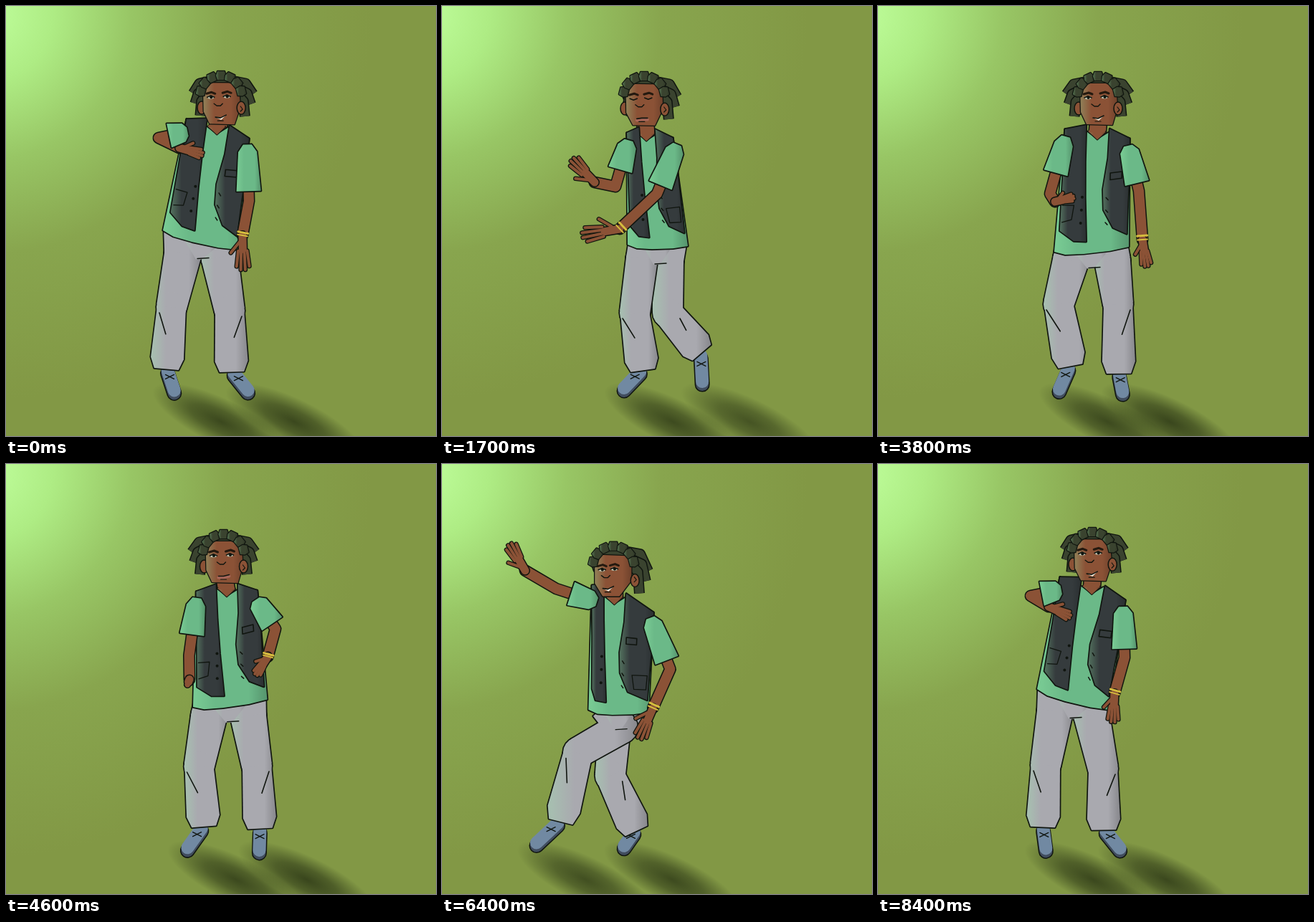
An HTML page with a canvas that plays this animation: 600x600 px, repeating every 8.5 s.

```html
<!DOCTYPE html>
<html lang="en">
<head>
<meta charset="utf-8">
<title>Dancer</title>
<style>
html, body { margin: 0; width: 100%; height: 100%; overflow: hidden; background: #829845; }
canvas { display: block; width: 100vw; height: 100vh; }
</style>
</head>
<body>
<canvas id="stage" width="600" height="600"></canvas>
<script>
const ctx = document.getElementById('stage').getContext('2d');
const LOOP = 8500, STEP = 100;
const INK = '#10150f', SKIN = '#8b5236', SHIRT = '#6bb988', VEST = '#353b3d',
      PANTS = '#a9a9af', HAIR = '#3a432f', SHOE = '#7189a2', SOLE = '#414d5e';

// Poses: shoulders, hem, arms (elbow, wrist, tip) and legs (hip, knee, ankle, toe).
// face = [turn to the left, eyes open, smile]
const keys = [];
const key = (time, pose) => { keys.push({ time, pose }); return pose; };

const rest = key(0, {
  head: [300, 137], face: [0.1, 1, 1],
  shoulderL: [252, 158], shoulderR: [339, 185], hemL: [219, 313], hemR: [323, 340],
  elbowL: [213, 184], wristL: [242, 198], tipL: [274, 207],
  elbowR: [339, 272], wristR: [330, 320], tipR: [331, 368],
  hipL: [247, 345], kneeL: [231, 420], ankleL: [224, 504], toeL: [234, 534],
  hipR: [298, 350], kneeR: [312, 425], ankleR: [315, 508], toeR: [336, 534]
});
key(1700, {
  head: [282, 138], face: [0.4, 0, 0],
  shoulderL: [258, 177], shoulderR: [322, 184], hemL: [259, 333], hemR: [343, 335],
  elbowL: [242, 252], wristL: [213, 246], tipL: [182, 214],
  elbowR: [300, 262], wristR: [248, 311], tipR: [196, 320],
  hipL: [279, 352], kneeL: [269, 428], ankleL: [280, 506], toeL: [256, 531],
  hipR: [315, 355], kneeR: [315, 428], ankleR: [361, 482], toeR: [363, 521]
});
const reach = key(2700, {
  head: [238, 155], face: [1, 1, 1],
  shoulderL: [208, 169], shoulderR: [294, 208], hemL: [203, 343], hemR: [286, 347],
  elbowL: [157, 172], wristL: [113, 145], tipL: [92, 107],
  elbowR: [317, 288], wristR: [293, 343], tipR: [275, 386],
  hipL: [250, 368], kneeL: [188, 402], ankleL: [164, 496], toeL: [132, 526],
  hipR: [238, 375], kneeR: [232, 435], ankleR: [268, 510], toeR: [253, 531]
});
key(3800, {
  head: [307, 138], face: [0, 1, 1],
  shoulderL: [261, 172], shoulderR: [351, 185], hemL: [246, 343], hemR: [350, 336],
  elbowL: [240, 262], wristL: [247, 273], tipL: [273, 267],
  elbowR: [364, 258], wristR: [369, 326], tipR: [375, 363],
  hipL: [269, 355], kneeL: [252, 416], ankleL: [268, 500], toeL: [254, 532],
  hipR: [327, 355], kneeR: [335, 416], ankleR: [336, 510], toeR: [341, 536]
});
key(5400, {
  head: [300, 138], face: [0, 1, 0],
  shoulderL: [270, 184], shoulderR: [350, 168], hemL: [276, 335], hemR: [379, 321],
  elbowL: [271, 272], wristL: [265, 328], tipL: [232, 352],
  elbowR: [388, 202], wristR: [362, 211], tipR: [323, 225],
  hipL: [297, 350], kneeL: [287, 428], ankleL: [284, 507], toeL: [256, 534],
  hipR: [349, 348], kneeR: [365, 426], ankleR: [373, 502], toeR: [366, 537]
});
key(6500, reach);
key(7300, {
  head: [260, 125], face: [1, 1, 1],
  shoulderL: [238, 163], shoulderR: [318, 176], hemL: [240, 284], hemR: [322, 303],
  elbowL: [168, 180], wristL: [167, 115], tipL: [172, 69],
  elbowR: [348, 252], wristR: [334, 310], tipR: [320, 354],
  hipL: [296, 307], kneeL: [220, 306], ankleL: [240, 386], toeL: [209, 412],
  hipR: [263, 330], kneeR: [271, 430], ankleR: [275, 510], toeR: [248, 531]
});
key(8100, rest);
key(8400, { ...rest,
  head: [299, 135], shoulderL: [254, 158], shoulderR: [345, 190],
  hemL: [222, 314], hemR: [322, 343], wristL: [238, 199], tipL: [268, 213],
  elbowR: [344, 270], tipR: [328, 360], kneeL: [234, 420], ankleL: [230, 504],
  kneeR: [314, 425]
});
key(LOOP, rest);

const lerp = (a, b, k) => a.map((v, i) => v + (b[i] - v) * k);
const shift = (p, x, y) => [p[0] + x, p[1] + y];

function poseAt(time) {
  const i = keys.findIndex(k => k.time > time);
  const from = keys[i - 1], to = keys[i];
  const k = (time - from.time) / (to.time - from.time);
  const eased = (1 - Math.cos(Math.PI * k)) / 2;
  const pose = {};
  for (const part in rest) pose[part] = lerp(from.pose[part], to.pose[part], eased);
  return pose;
}

function trace(points, closed) {
  ctx.beginPath();
  points.forEach(p => ctx.lineTo(...p));
  if (closed) ctx.closePath();
}

function line(points, width = 1.6, color = INK) {
  trace(points);
  ctx.lineWidth = width;
  ctx.strokeStyle = color;
  ctx.stroke();
}

// Polygons merged under one outline, lit from the left and shaded on the right
function merged(polygons, color, outline = 3.4) {
  const xs = polygons.flat().map(p => p[0]);
  const light = ctx.createLinearGradient(Math.min(...xs), 0, Math.max(...xs), 0);
  light.addColorStop(0, 'rgba(160,255,180,.28)');
  light.addColorStop(0.3, 'rgba(160,255,180,0)');
  light.addColorStop(0.75, 'rgba(0,0,0,0)');
  light.addColorStop(1, 'rgba(0,0,0,.2)');
  if (outline) polygons.forEach(points => line([...points, points[0], points[1]], outline));
  for (const points of polygons) {
    trace(points, true);
    ctx.fillStyle = color;
    ctx.fill();
  }
  // One union path, so that the light is not applied twice where parts overlap
  ctx.beginPath();
  for (const points of polygons) {
    points.forEach((p, i) => i ? ctx.lineTo(...p) : ctx.moveTo(...p));
    ctx.closePath();
  }
  ctx.fillStyle = light;
  ctx.fill();
}

const shape = (points, color, outline) => merged([points], color, outline);

function strand(points, width, color) {
  line(points, width + 3, INK);
  line(points, width, color);
}

function dot(x, y, rx, ry, color, outline) {
  ctx.beginPath();
  ctx.ellipse(x, y, rx, ry, 0, 0, 7);
  ctx.fillStyle = color;
  ctx.fill();
  if (outline) { ctx.lineWidth = 1.5; ctx.strokeStyle = INK; ctx.stroke(); }
}

// Outline of a limb with a half-width at each joint
function tube(points, widths) {
  const left = [], right = [];
  points.forEach((p, i) => {
    const a = points[Math.max(i - 1, 0)], b = points[Math.min(i + 1, points.length - 1)];
    const dx = b[0] - a[0], dy = b[1] - a[1], k = widths[i] / (Math.hypot(dx, dy) || 1);
    left.push(shift(p, dy * k, -dx * k));
    right.unshift(shift(p, -dy * k, dx * k));
  });
  return left.concat(right);
}

const disc = (center, radius) => Array.from({ length: 20 }, (_, i) =>
  shift(center, radius * Math.cos(i * Math.PI / 10), radius * Math.sin(i * Math.PI / 10)));

function background() {
  const glow = ctx.createRadialGradient(-30, 10, 0, -30, 10, 600);
  glow.addColorStop(0, '#bfff9c');
  glow.addColorStop(0.16, '#aeec84');
  glow.addColorStop(0.34, '#98c665');
  glow.addColorStop(0.56, '#88a54e');
  glow.addColorStop(0.9, '#829845');
  ctx.fillStyle = glow;
  ctx.fillRect(0, 0, 600, 600);
}

function footShadow(toe) {
  const strength = Math.max(0, 1 - (535 - toe[1]) / 90) * 0.75;
  const blur = ctx.createRadialGradient(0, 0, 0, 0, 0, 1);
  blur.addColorStop(0, `rgba(34,44,16,${strength})`);
  blur.addColorStop(0.45, `rgba(34,44,16,${strength * 0.7})`);
  blur.addColorStop(1, 'rgba(34,44,16,0)');
  ctx.save();
  ctx.translate(toe[0] + 66, 580);
  ctx.rotate(0.45);
  ctx.scale(105, 32);
  ctx.fillStyle = blur;
  ctx.fillRect(-1, -1, 2, 2);
  ctx.restore();
}

function leg(waist, half, hip, knee, ankle, toe, side) {
  const heel = lerp(ankle, toe, 0.15), front = lerp(ankle, toe, 1.08);
  strand([shift(heel, 0, 4), shift(front, 0, 4)], 18, SOLE);
  line([heel, front], 18, SHOE);
  const lace = lerp(heel, toe, 0.35);
  line([shift(lace, -6, -3), shift(lace, 6, 3)], 1.3);
  line([shift(lace, 6, -3), shift(lace, -6, 3)], 1.3);

  const thigh = Math.max(22, half);
  merged([
    tube([waist, hip], [half, thigh]), disc(hip, thigh),
    tube([hip, knee], [thigh, 21]), disc(knee, 21),
    tube([knee, lerp(knee, ankle, 0.85), lerp(knee, ankle, 1.03)], [20, 23, 17])
  ], PANTS);
  line([shift(knee, -side * 17, 8), shift(lerp(knee, ankle, 0.45), -side * 5, 0)]);
}

function hand(wrist, tip, side) {
  const dx = tip[0] - wrist[0], dy = tip[1] - wrist[1];
  const at = (along, across) =>
    shift(lerp(wrist, tip, along), -dy * across * side, dx * across * side);
  const palm = at(0.4, 0);
  const fingers = [-0.18, -0.06, 0.07, 0.19].map((s, i) => [at(0.45, s * 0.7), at(i % 3 ? 1 : 0.9, s)]);
  fingers.push([at(0.2, 0.1), at(0.5, 0.35)]);
  fingers.forEach(f => line(f, 6.5));
  line([wrist, palm], 14);
  fingers.forEach(f => line(f, 4, SKIN));
  line([wrist, palm], 11, SKIN);
}

function arm(root, elbow, wrist, tip, side, sleeve) {
  const cuff = lerp(root, elbow, sleeve);
  strand([lerp(root, elbow, sleeve / 2), elbow, wrist], 14, SKIN);
  hand(wrist, tip, side);
  shape(tube([lerp(root, elbow, -0.15), root, cuff], [6, 13, 17]), SHIRT);
}

function torso(p) {
  const turn = p.face[0];
  const on = (u, v) => lerp(lerp(p.shoulderL, p.shoulderR, u), lerp(p.hemL, p.hemR, u), v);
  const neck = shift(on(0.5, 0), -12 * turn, 8);
  strand([shift(p.head, 1, 18), shift(neck, 0, -8)], 23, SKIN);
  shape([on(0, 0), shift(neck, -16, -12), neck, shift(neck, 16, -10), on(1, 0), on(1, 0.5),
    on(1, 1), on(0.75, 1.025), on(0.4, 1.035), on(0.15, 1.03), on(0, 1)], SHIRT);
  shape([shift(neck, -13, -12), neck, shift(neck, 12, -11)], SKIN, 2);
  line([shift(neck, -10, -12), shift(neck, 9, -12)], 4, SKIN);

  // Turning the body slides the open front of the vest sideways
  const slide = u => u > 0.1 && u < 0.9 ? u - 0.14 * turn : u;
  const panel = points => shape(points.map(([u, v]) => on(slide(u), v)), VEST);
  panel([[0, 0], [0.32, -0.06], [0.34, 0.25], [0.37, 0.55], [0.42, 0.93], [0.25, 0.92], [0.05, 0.83], [0.03, 0.4]]);
  panel([[0.69, -0.06], [1, 0], [1, 0.3], [0.98, 0.6], [0.97, 0.88], [0.78, 0.82], [0.64, 0.66], [0.62, 0.48], [0.68, 0.2]]);
  for (const v of [0.55, 0.66, 0.77]) {
    dot(...on(slide(0.33), v), 2, 2, INK);
    line([on(slide(0.67), v), on(slide(0.7), v + 0.02)], 1.5);
  }
  line([[0.72, 0.33], [0.89, 0.31], [0.89, 0.37], [0.72, 0.39], [0.72, 0.33]].map(([u, v]) => on(slide(u), v)));
  if (turn < 0.3) line([on(0.06, 0.62), on(0.22, 0.62), on(0.2, 0.74), on(0.07, 0.76)], 1.3);
  else line([on(0.7, 0.66), on(0.95, 0.64), on(0.94, 0.78), on(0.74, 0.79), on(0.7, 0.66)], 1.3);
  return on;
}

function eye(x, y, open) {
  line([[x - 6, y - 5], [x + 1, y - 7], [x + 6, y - 5]], 3, '#24190f');
  if (open > 0.5) {
    dot(x, y, 4.6, 2.3, '#c3cbb8');
    dot(x + 0.5, y, 2.1, 2.1, INK);
  }
  line([[x - 5, y], [x, open > 0.5 ? y - 2.2 : y + 2], [x + 5, y]], 1.6);
}

function head(p) {
  const [turn, open, smile] = p.face;
  const mix = (front, side) => lerp(front, side, turn);
  const front = turn < 0.6;
  ctx.save();
  ctx.translate(...p.head);

  const locks = (side, droop) => {
    ctx.lineCap = 'butt';
    for (const [a, b, c] of [
      [[14, -33], [34, -29], [44, -15 + droop]],
      [[18, -24], [36, -15], [41, -1 + droop]],
      [[22, -14], [31, -4], [33, 16 + droop]]
    ]) strand([a, b, c].map(([x, y]) => [x * side, y]), 12, HAIR);
    ctx.lineCap = 'round';
  };
  dot(0, -16, 30, 27, HAIR, true);
  locks(1 + 0.1 * turn, 10 * turn);
  if (front) {
    locks(-Math.max(0.55, 1 - 1.2 * turn), 0);
    dot(-27, 5, 6, 9, SKIN, true);
  }
  shape([mix([-25, -30], [-26, -28]), mix([25, -30], [25, -26]), mix([27, 4], [25, 8]),
    mix([20, 28], [8, 30]), mix([-16, 27], [-15, 30]), mix([-24, 10], [-26, 12])], SKIN, 2.6);
  dot(28 + 2 * turn, 5 + 3 * turn, 6, 9, SKIN, true);
  line([[27 + 2 * turn, 3], [30 + 2 * turn, 7], [27 + 2 * turn, 10]], 1.2);

  // Row of short locks along the hairline
  for (let i = 0; i < 7; i++) {
    const angle = Math.PI * (1.08 + i * 0.14), x = Math.cos(angle), y = Math.sin(angle);
    const lock = r => [x * r, -11 + y * r];
    shape(tube([lock(23), lock(29), lock(35)], [5, 7, 5]), HAIR, 2.4);
  }
  eye(...mix([-14, -10], [-16, -7]), open);
  eye(...mix([9, -11], [1, -8]), open);
  const nose = mix([-3, 0], [-11, 2]);
  line([shift(nose, -6, -1), shift(nose, -2, 2), shift(nose, 3, 2), shift(nose, 6, -1)], 1.4);
  const mouth = mix([0, 18], [-8, 19]);
  const lip = [shift(mouth, -7, 1 - smile), shift(mouth, 0, smile), shift(mouth, 8, -3 * smile)];
  if (smile > 0.5) {
    trace([...lip, shift(mouth, 1, 4)], true);
    ctx.fillStyle = '#eee9dc';
    ctx.fill();
  } else line(lip.map(q => shift(q, 0, 2)), 4, '#a8675a');
  line(lip, 1.6);
  line([shift(mouth, -4, 5), shift(mouth, 4, 5)], 1.2);
  ctx.restore();
}

function draw(time) {
  const p = poseAt(time);
  ctx.lineJoin = ctx.lineCap = 'round';
  background();
  footShadow(p.toeL);
  footShadow(p.toeR);
  const half = Math.hypot(p.hemR[0] - p.hemL[0], p.hemR[1] - p.hemL[1]) * 0.24;
  const waist = k => shift(lerp(p.hemL, p.hemR, k), 0, -5);
  leg(waist(0.74), half, p.hipR, p.kneeR, p.ankleR, p.toeR, -1);
  leg(waist(0.26), half, p.hipL, p.kneeL, p.ankleL, p.toeL, 1);
  const middle = lerp(p.hemL, p.hemR, 0.5);
  shape([lerp(p.hemL, middle, 0.5), lerp(p.hemR, middle, 0.5), shift(middle, 3, 27), shift(middle, -6, 27)], PANTS, 0);
  line([shift(middle, -4, 26), shift(middle, 12, 25)], 1.4);
  const on = torso(p);
  arm(on(0, 0.12), p.elbowL, p.wristL, p.tipL, -1, 0.58);
  arm(on(1, 0.12), p.elbowR, p.wristR, p.tipR, 1, 0.8);
  const band = lerp(p.elbowR, p.wristR, 0.92);
  const cuff = tube([band, p.wristR], [7, 7]);
  line([cuff[0], cuff[3]], 3, '#d6bd3e');
  line([cuff[1], cuff[2]], 2, '#d6bd3e');
  head(p);
}

function frame() {
  const time = performance.now() % LOOP;
  draw(Math.floor(time / STEP) * STEP);
  requestAnimationFrame(frame);
}
frame();
</script>
</body>
</html>
```
